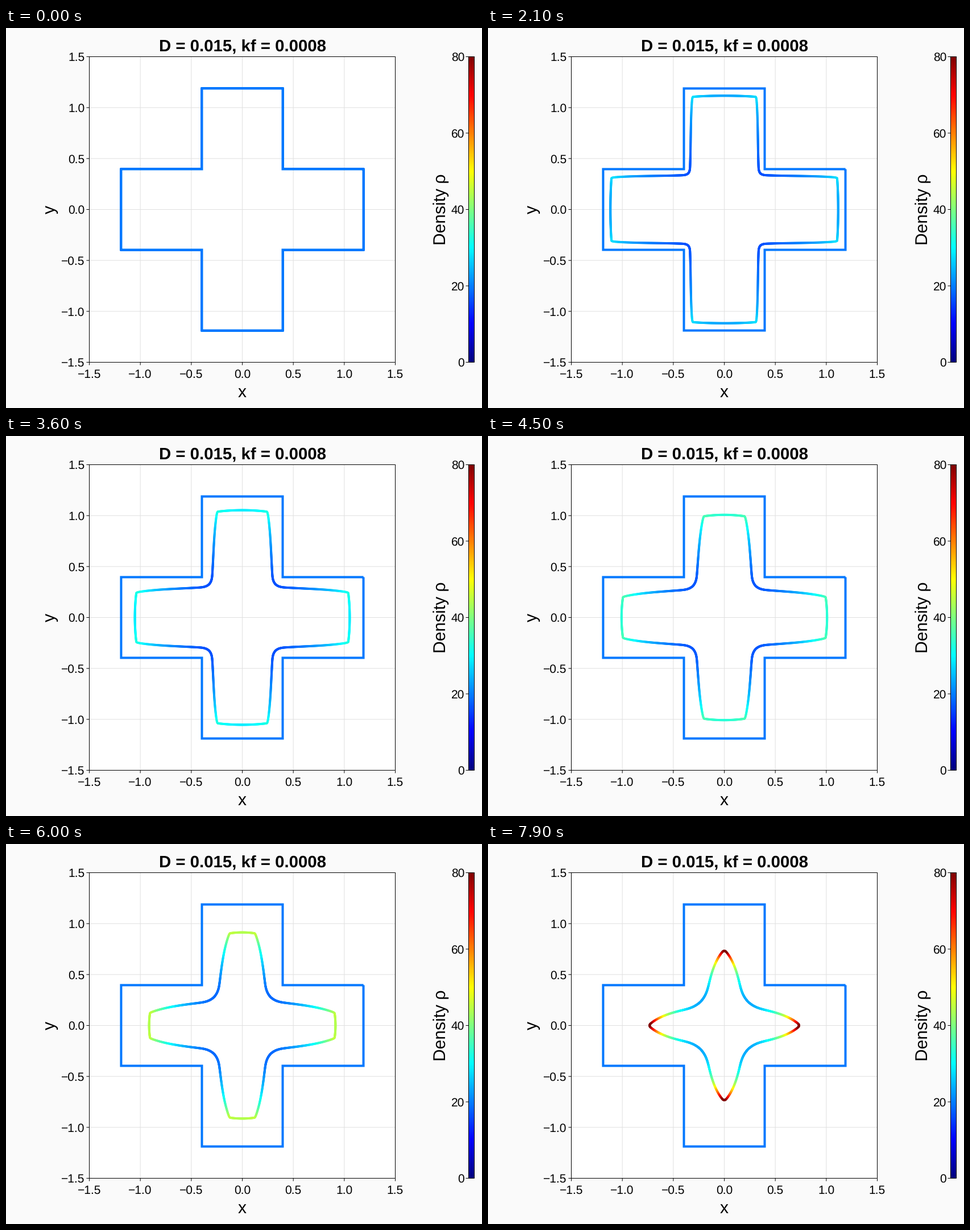
These frames come from a looping animation (837x669 px, 8000 ms). A matplotlib script:

```python
import numpy as np
import matplotlib.pyplot as plt
from matplotlib.animation import FuncAnimation
from matplotlib.collections import LineCollection
from matplotlib.colors import LinearSegmentedColormap

plt.rcParams["font.family"] = "Liberation Sans"
plt.rcParams["text.hinting"] = "none"

W, H, DPI = 837, 669, 64
PT = 72 / DPI                      # points per pixel
FRAMES, STEP = 80, 100
LEFT, RIGHT, TOP, BOTTOM = 146.5, 684.5, 50.5, 588.5
CX, CY = (LEFT + RIGHT) / 2, (TOP + BOTTOM) / 2
UNIT = (RIGHT - LEFT) / 3          # pixels per data unit

D, KF = 0.015, 0.0008              # diffusion, growth rate
RHO0, RHO_MAX = 19.5, 80           # starting density, top of the colour scale
INNER, OUTER = 0.396, 1.188        # half width and half length of the cross
TIME_PER_FRAME, SUBSTEPS = 0.206, 20
N = 144                            # angular cells in one eighth of the cross

jet = LinearSegmentedColormap.from_list("jet5", [
    (0, "#000080"), (0.125, "#0000ff"), (0.375, "#00ffff"),
    (0.625, "#ffff00"), (0.875, "#ff0000"), (1, "#800000")], N=512)

theta = np.linspace(0, np.pi / 4, N + 1)
dth = theta[1]


def lengths(r):
    """Lengths of the segments, and of the cells around the nodes."""
    seg = np.abs(np.diff(r * np.exp(1j * theta)))
    cell = (np.append(seg, 0) + np.append(0, seg)) / 2
    return seg, cell


def advance(r, rho, dt):
    """The front moves inwards at speed KF * rho and carries its cells along."""
    slope = np.diff(r) / dth
    back = np.append(-slope[0], slope)
    ahead = np.append(slope, -slope[-1])
    steep = np.maximum(np.maximum(back, 0), np.maximum(-ahead, 0))

    # Upwind drift of cells along the front, closed at both symmetry lines
    up = np.where(slope > 0, rho[:-1], rho[1:])
    flux = KF * up ** 2 * slope / ((r[:-1] + r[1:]) / 2)
    mass = rho * lengths(r)[1] - dt * np.diff(flux, prepend=0, append=0)

    r = r - dt * KF * rho * np.sqrt(1 + (steep / r) ** 2)

    # Implicit diffusion on the new front
    seg, cell = lengths(r)
    k = D * dt / seg
    diag = cell + np.append(k, 0) + np.append(0, k)
    system = np.diag(diag) - np.diag(k, 1) - np.diag(k, -1)
    return r, np.linalg.solve(system, mass)


def simulate():
    r = np.minimum(OUTER / np.cos(theta), INNER / np.maximum(np.sin(theta), 1e-9))
    rho = np.full(N + 1, RHO0)
    states = []
    for _ in range(FRAMES):
        states.append((r, rho))
        for _ in range(SUBSTEPS):
            r, rho = advance(r, rho, TIME_PER_FRAME / SUBSTEPS)
    return states


def around(a):
    """Unfold one eighth to the closed ring."""
    ring = np.tile(np.concatenate([a, a[-2:0:-1]]), 4)
    return np.append(ring, ring[0])


fig = plt.figure(figsize=(W / DPI, H / DPI), dpi=DPI, facecolor="#fafafa")
ax = fig.add_axes([0, 0, 1, 1])
ax.axis("off")


def line(xs, ys, color="black", width=1, **kw):
    ax.plot(xs, ys, color=color, lw=width * PT, snap=False,
            solid_joinstyle="miter", solid_capstyle="butt", **kw)


def label(x, y, text, size=21, ha="center", **kw):
    ax.text(x, y, text, fontsize=size * PT, ha=ha, va="baseline",
            rotation_mode="anchor", **kw)


def frame_box(x0, x1):
    line([x0, x1, x1, x0, x0, x1], [TOP, TOP, BOTTOM, BOTTOM, TOP, TOP], zorder=2)


ax.fill([LEFT, RIGHT, RIGHT, LEFT], [TOP, TOP, BOTTOM, BOTTOM], "white", lw=0, zorder=0)
for v in np.arange(-1.5, 2, 0.5):
    x, y = CX + v * UNIT, CY - v * UNIT
    text = f"{v:.1f}".replace("-", "\u2212")
    if abs(v) < 1.5:
        line([x, x], [TOP, BOTTOM], "#e0e0e0", zorder=1)
        line([LEFT, RIGHT], [y, y], "#e0e0e0", zorder=1)
    line([x, x], [BOTTOM, BOTTOM + 5], zorder=2)
    line([LEFT - 5, LEFT], [y, y], zorder=2)
    label(x, 615.5, text)
    label(138.5, y + 7.5, text, ha="right")
frame_box(LEFT, RIGHT)

label(CX + 0.5, 41, f"D = {D}, kf = {KF}", 29.33, weight="bold")
label(CX, 650, "x", 30)
label(87, CY, "y", 30, rotation=90)
label(773, CY, "Density \u03c1", 30, rotation=90)

bar = (813.5, 823.5)
ax.imshow(np.linspace(1, 0, 512)[:, None], cmap=jet, aspect="auto",
          extent=(*bar, BOTTOM, TOP), zorder=1)
frame_box(*bar)
for v in range(0, RHO_MAX + 1, 20):
    y = BOTTOM - (BOTTOM - TOP) * v / RHO_MAX
    line([bar[0] - 5, bar[0]], [y, y], zorder=2)
    label(806, y + 7.5, str(v), ha="right")

# Starting outline: an open polyline that ends where it began
arm = UNIT * np.array([OUTER + 1j * INNER, OUTER - 1j * INNER, INNER - 1j * INNER])
cross = np.append(np.concatenate([arm * (-1j) ** k for k in range(4)]), arm[0])
line(CX + cross.real, CY - cross.imag, jet(RHO0 / RHO_MAX), 4, zorder=3)

curve = LineCollection([], cmap=jet, linewidths=4 * PT, capstyle="round", zorder=4)
curve.set_clim(0, RHO_MAX)
ax.add_collection(curve, autolim=False)
ax.set_xlim(0, W)
ax.set_ylim(H, 0)

angles = np.linspace(0, 2 * np.pi, 8 * N + 1)
states = simulate()


def update(i):
    r, rho = map(around, states[i])
    pts = np.column_stack([CX + UNIT * r * np.cos(angles),
                           CY - UNIT * r * np.sin(angles)])
    curve.set_segments(np.stack([pts[:-1], pts[1:]], axis=1))
    curve.set_array((rho[:-1] + rho[1:]) / 2)
    return (curve,)


anim = FuncAnimation(fig, update, frames=FRAMES, interval=STEP, repeat=True,
                     repeat_delay=0, blit=False)
plt.show()
```
